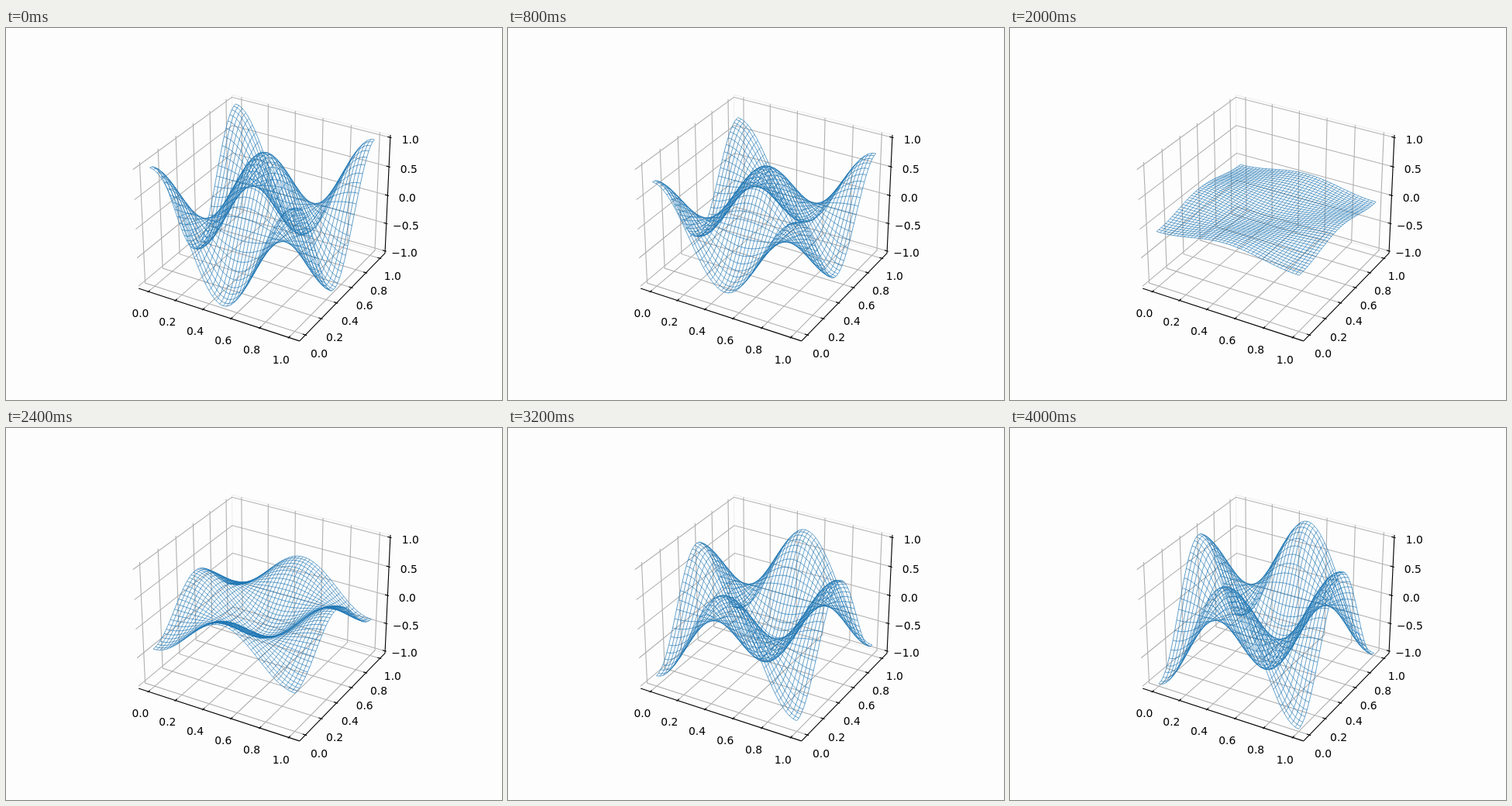
Recreate the animation shown at these times as an HTML page with a canvas. Size 640x480 px, loop 4.1 s.

```html
<!DOCTYPE html>
<html lang="en">
<head>
<meta charset="utf-8">
<title>Standing wave</title>
<style>
  html, body { margin: 0; width: 100%; height: 100%; overflow: hidden; background: #fdfdfd; }
  canvas { display: block; }
</style>
</head>
<body>
<canvas id="stage" width="640" height="480"></canvas>
<script>
const ctx = document.getElementById('stage').getContext('2d');

// Camera: azimuth -60°, elevation 30°, 10 units from the box centre.
const AZIM = -Math.PI / 3, ELEV = Math.PI / 6, DIST = 10, SCALE = 1997.8;
const ca = Math.cos(AZIM), sa = Math.sin(AZIM), ce = Math.cos(ELEV), se = Math.sin(ELEV);
const BOX_XY = 8 / 7, BOX_Z = 6 / 7;

// Axis limits including the margin between data and panes.
const LO = 0.5 - 1.1 * 25 / 48, HI = 1 - LO, TOP = 25 / 24, BOTTOM = -TOP;
const STEP = 1.1 / 12;
const LABEL_XY = 0.0934, LABEL_Z = 0.17;

const FRAME_MS = 100, FRAMES = 41, LINES = 40, SAMPLES = 80;

function project([x, y, z]) {
  const px = BOX_XY * (x - 0.5) / 1.1, py = BOX_XY * (y - 0.5) / 1.1, pz = BOX_Z * z / 2;
  const right = -sa * px + ca * py;
  const up = -se * ca * px - se * sa * py + ce * pz;
  const k = SCALE / (DIST - (ce * ca * px + ce * sa * py + se * pz));
  return [333 + right * k, 237.4 - up * k];
}

function line(points, color, width) {
  ctx.beginPath();
  for (const p of points) ctx.lineTo(...project(p));
  ctx.strokeStyle = color;
  ctx.lineWidth = width;
  ctx.stroke();
}

function label(value, at) {
  const [x, y] = project(at);
  ctx.fillText(value.toFixed(1).replace('-', '\u2212'), x, y + 11);
}

const grid = points => line(points, '#b0b0b0', 1.11);
const axis = points => line(points, '#000', 1.11);

function drawAxes() {
  ctx.font = '13.89px "DejaVu Sans", sans-serif';
  ctx.textAlign = 'center';
  ctx.fillStyle = '#000';
  const out = 0.1 * STEP, inner = 0.2 * STEP;
  const low = BOTTOM - LABEL_Z, near = LO - LABEL_XY, far = HI + LABEL_XY;
  const unit = [0, 0.2, 0.4, 0.6, 0.8, 1], heights = [-1, -0.5, 0, 0.5, 1];

  line([[LO, HI, BOTTOM], [HI, HI, BOTTOM], [HI, HI, TOP], [LO, HI, TOP], [LO, HI, BOTTOM]], '#eee', 1);

  for (const v of unit) {
    grid([[v, LO, BOTTOM], [v, HI, BOTTOM], [v, HI, TOP]]);
    grid([[HI, v, BOTTOM], [LO, v, BOTTOM], [LO, v, TOP]]);
  }
  for (const v of heights) grid([[LO, LO, v], [LO, HI, v], [HI, HI, v]]);

  axis([[LO, LO, BOTTOM], [HI, LO, BOTTOM]]);
  axis([[HI, LO, BOTTOM], [HI, HI, BOTTOM]]);
  axis([[HI, HI, BOTTOM], [HI, HI, TOP]]);

  for (const v of unit) {
    axis([[v, LO - out, BOTTOM], [v, LO + inner, BOTTOM]]);
    axis([[HI + out, v, BOTTOM], [HI - inner, v, BOTTOM]]);
    label(v, [v, near, low]);
    label(v, [far, v, low]);
  }
  for (const v of heights) {
    axis([[HI + out, HI, v], [HI - inner, HI, v]]);
    label(v, [far, far, v]);
  }
}

function drawWave(amplitude) {
  const wave = (x, y) =>
    [x, y, amplitude * Math.cos(2 * Math.PI * x) * Math.cos(2 * Math.PI * y)];
  const samples = Array.from({ length: SAMPLES + 1 }, (_, i) => i / SAMPLES);
  for (let i = 0; i <= LINES; i++) {
    const c = i / LINES;
    line(samples.map(s => wave(s, c)), '#1f77b4', 0.69);
    line(samples.map(s => wave(c, s)), '#1f77b4', 0.69);
  }
}

function draw(now) {
  const step = Math.floor(now / FRAME_MS) % FRAMES;
  ctx.fillStyle = '#fdfdfd';
  ctx.fillRect(0, 0, 640, 480);
  drawAxes();
  drawWave(Math.cos((step + 1) * Math.PI / 40));
  requestAnimationFrame(draw);
}
requestAnimationFrame(draw);
</script>
</body>
</html>
```
